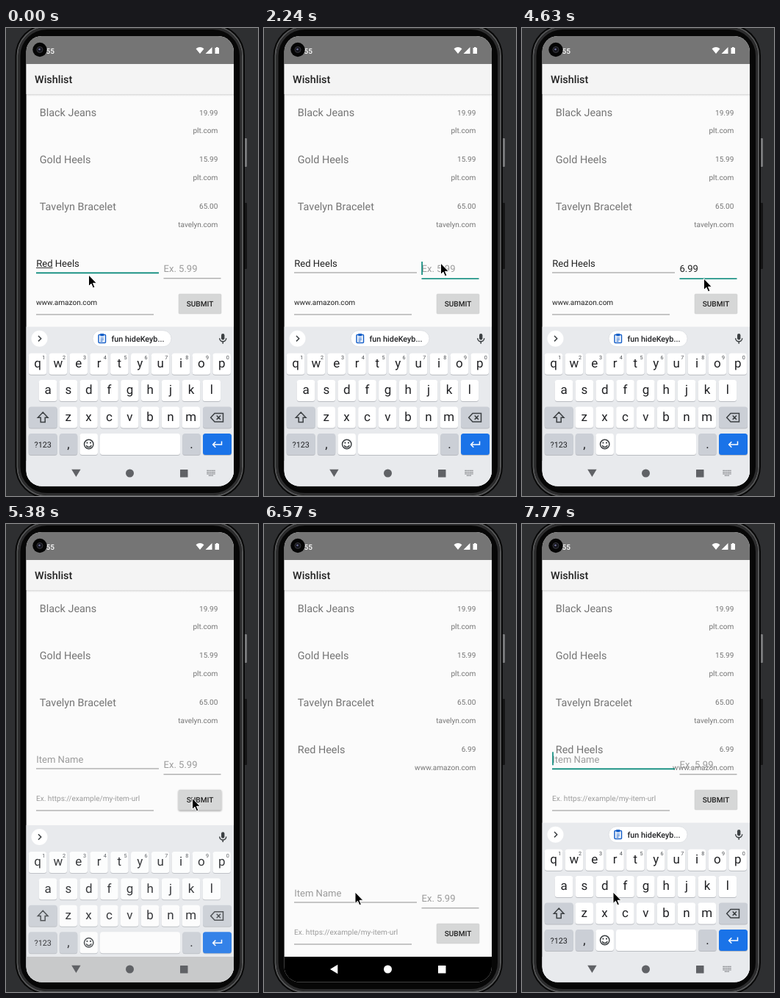
An HTML page for the animation above (8 s loop, 343x637 px).

```html
<!DOCTYPE html>
<html lang="en">
<head>
<meta charset="utf-8">
<title>Wishlist</title>
<style>
  html, body { margin: 0; width: 100%; height: 100%; overflow: hidden; background: #2e2f31; }
  svg { display: block; width: 343px; height: 637px; font-family: Roboto, sans-serif; text-rendering: geometricPrecision; }
  .list { fill: #757575; font-size: 10.07px; }
  .list .item { font-size: 14.39px; }
  .input { font-size: 13.05px; fill: #212121; }
  .small { font-size: 10.07px; }
  .hint { fill: #9b9b9b; }
  .medium { font-weight: 500; }
  .end { text-anchor: end; }
  .key { font-size: 17px; text-anchor: middle; fill: #202124; }
  .digit { font-size: 7.2px; text-anchor: middle; fill: #4a4d51; }
  .icon { fill: none; stroke: #3c4043; stroke-width: 1.5; }
</style>
</head>
<body>
<svg viewBox="0 0 343 637">
  <defs>
    <linearGradient id="fade" x2="0" y2="1"><stop stop-color="#000" stop-opacity=".14"/><stop offset="1" stop-color="#000" stop-opacity="0"/></linearGradient>
    <filter id="soft" x="-20%" y="-30%" width="140%" height="180%"><feDropShadow dx="0" dy="1.2" stdDeviation="1.3" flood-opacity=".45"/></filter>
    <clipPath id="screen"><rect x="27.6" y="11" width="282.4" height="612.6" rx="21"/></clipPath>
  </defs>

  <rect width="343" height="637" fill="#2e2f31"/>
  <rect x="324.5" y="150" width="3.5" height="39" rx="1" fill="#77787a"/>
  <rect x="324.5" y="238" width="3.5" height="90" rx="1" fill="#141415"/>
  <rect x="12.5" y="-5" width="312.5" height="645" rx="43" fill="#070707"/>
  <g fill="none">
    <rect x="15.5" y="-2" width="306.5" height="639" rx="40" stroke="#555657" stroke-width="2"/>
    <rect x="18" y=".5" width="301.5" height="634" rx="37.5" stroke="#2c2c2d" stroke-width="3"/>
  </g>

  <g clip-path="url(#screen)">
    <rect x="27" y="11" width="284" height="613" fill="#fbfbfb"/>
    <rect x="27" y="90" width="284" height="3" fill="url(#fade)"/>
    <rect x="27" y="49" width="284" height="41" fill="#f4f4f4"/>
    <rect x="27" y="11" width="284" height="38" fill="#757575"/>
    <text class="small medium end" x="66" y="34.5" fill="#fff">55</text>
    <path fill="#fff" d="M258.5 28.2Q264 24 269.5 28.2L264 35ZM280.5 26V35H271.5ZM284.5 27H286V26H288.5V27H290V35H284.5Z"/>
    <circle cx="46" cy="29.5" r="9.7" fill="#050505"/>
    <circle cx="46" cy="29.5" r="4" fill="#15161d" stroke="#38383d"/>
    <circle cx="45.5" cy="29" r="1.3" fill="#6e7099"/>
    <text class="medium" x="39" y="75" font-size="14.39" fill="#212121">Wishlist</text>

    <g id="list" class="list"></g>

    <g id="form">
      <text id="name" class="input" x="41.2" y="324.8"></text>
      <path id="composing" d="M41 326.5H63.5" stroke="#333"/>
      <text id="price" class="input" x="214.5" y="332.3"></text>
      <text id="url" class="input small" x="41" y="376.6"></text>
      <path id="nameLine" d="M41 333H208"/>
      <path id="priceLine" d="M214.5 340.8H292.5"/>
      <path d="M41 390H201" stroke="#8f8f8f"/>
      <rect id="button" x="235" y="362" width="58" height="27" rx="1.5" fill="#d6d7d7" stroke="#c9caca" stroke-width=".5"/>
      <text class="small medium" x="264" y="379.4" text-anchor="middle" fill="#212121">SUBMIT</text>
      <rect id="caret" width="1.6" height="18" fill="#008577"/>
    </g>

    <g id="keyboard">
      <rect x="27" y="406.6" width="284" height="240" fill="#e8eaed"/>
      <circle cx="45.5" cy="422.7" r="11" fill="#fff"/>
      <path class="icon" d="M44 419L47.7 422.7L44 426.4"/>
      <g id="chip">
        <rect x="118" y="411.7" width="107" height="22" rx="11" fill="#fff" stroke="#dadce0" stroke-width=".8"/>
        <rect x="126" y="417.5" width="9.5" height="11" rx="1" fill="none" stroke="#1a62c9" stroke-width="1.5"/>
        <path d="M128.3 416H133.2V419.5H128.3ZM128.5 421.5H133V422.5H128.5ZM128.5 423.7H133V424.7H128.5ZM128.5 425.8H131.5V426.8H128.5Z" fill="#1a62c9"/>
        <text class="medium" x="143.5" y="426.8" font-size="10.8" fill="#202124">fun hideKeyb...</text>
      </g>
      <rect x="293" y="416" width="4.4" height="8.4" rx="2.2" fill="#3c4043"/>
      <path class="icon" d="M290.7 422.3A4.5 4.5 0 0 0 299.7 422.3M295.2 426.8V429.8"/>
      <g id="keys"></g>
    </g>

    <rect id="nav" x="27" y="589" width="284" height="36"/>
    <g id="navIcons">
      <path id="back" d="M89.2 600.7H101.6L95.4 611Z"/>
      <circle cx="168.5" cy="606" r="5.5"/>
      <rect x="237" y="601" width="10.5" height="10.5" rx=".6"/>
    </g>
    <path id="switcher" d="M273.5 602.3H285M273.5 604.6H285M273.5 606.9H285M276 609.2H282.5" stroke="#606266" stroke-width="1.2" stroke-dasharray="1.3 .9"/>
  </g>

  <path id="mouse" d="M-.5 0V15.5L3 12.2L5.4 17.8L7.9 16.8L5.5 11.3H10.4Z" fill="#000" stroke="#fff"/>
</svg>

<script>
const $ = id => document.getElementById(id);
const set = (id, attrs) => { for (const k in attrs) $(id).setAttribute(k, attrs[k]); };
const show = (id, on) => set(id, { visibility: on ? 'visible' : 'hidden' });

// Wishlist rows
const items = [
  ['Black Jeans', '19.99', 'plt.com'],
  ['Gold Heels', '15.99', 'plt.com'],
  ['Tavelyn Bracelet', '65.00', 'tavelyn.com'],
  ['Red Heels', '6.99', 'www.amazon.com'],
];
$('list').innerHTML = items.map(([name, price, url], i) => `
  <g id="row${i}" transform="translate(0 ${i * 63.9})">
    <text class="item" x="45.8" y="120">${name}</text>
    <text class="end" x="288.3" y="118.6">${price}</text>
    <text class="end" x="288.3" y="143.3">${url}</text>
  </g>`).join('');

// Keyboard
const PITCH = 27.85, GREY = '#cbcfd6';
const cap = (x, y, w, fill = '#fff') =>
  `<rect x="${x - w / 2}" y="${y - 13.5}" width="${w}" height="29" rx="3.5" fill="#b9bcc1"/>
   <rect x="${x - w / 2}" y="${y - 14.5}" width="${w}" height="29" rx="3.5" fill="${fill}"/>`;
const label = (x, y, text, size = 17) =>
  `<text class="key" x="${x}" y="${y}" style="font-size:${size}px">${text}</text>`;
const letters = (row, x0, y) => [...row].map((c, i) =>
  cap(x0 + i * PITCH, y, 24.5) + label(x0 + i * PITCH, y + 4.8, c)).join('');
const digits = [...'1234567890'].map((d, i) =>
  `<text class="digit" x="${51.2 + i * PITCH}" y="450.8">${d}</text>`).join('');

$('keys').innerHTML =
  letters('qwertyuiop', 43, 457.3) + digits +
  letters('asdfghjkl', 57, 493.5) +
  cap(50.2, 530, 39, GREY) + letters('zxcvbnm', 84.7, 530) + cap(287.5, 530, 39, GREY) +
  cap(50.2, 566.5, 39, GREY) + label(50.2, 570.8, '?123', 10.8) +
  cap(85, 566.5, 24.5, GREY) + label(85, 571.5, ',') +
  cap(112.7, 566.5, 24.5) + cap(182.5, 566.5, 109) +
  cap(252.5, 566.5, 24.5, GREY) + label(252.5, 571.5, '.') +
  cap(287.5, 566.5, 39, '#1a73e8') +
  `<path class="icon" d="M50.2 523L57 530.3H53.2V536.5H47.2V530.3H43.4Z
     M284 524.5H295.5V536H284L278.7 530.2ZM286.7 527.5L292 532.9M292 527.5L286.7 532.9"/>
   <circle class="icon" cx="112.7" cy="566.5" r="6.2"/>
   <path class="icon" d="M109.3 568A3.6 3.6 0 0 0 116.1 568"/>
   <circle cx="110.4" cy="564.6" r="1.1" fill="#3c4043"/><circle cx="115" cy="564.6" r="1.1" fill="#3c4043"/>
   <path class="icon" style="stroke:#fff" d="M293.5 562.5V567H281.8M285.3 563.3L281.6 567L285.3 570.7"/>`;

const LOOP = 8000, TICK = 149.4;

const mousePath = [[0, 113, 336], [3, 49, 368], [7, 240, 373], [8, 240, 373], [13, 241, 320], [30, 241, 320],
  [31, 248, 341], [34, 254, 373], [39, 254, 373], [43, 128, 498], [44, 124.5, 501], [60, 124.5, 501]];

// from, to, x, y
const carets = [[2, 5, 101, 310.3], [8, 11, 101, 310.3], [14, 17, 214.3, 318], [22, 23, 222, 318],
  [23, 26, 225, 318], [26, 28, 232.7, 318], [28, 31, 240.4, 318], [34, 36, 240.4, 318],
  [45, 49, 41.2, 310.3], [52, 60, 41.2, 310.3]];

const typed = n => n < 22 ? '' : '6.99'.slice(0, n < 23 ? 1 : n < 26 ? 2 : n < 28 ? 3 : 4);

function mouseAt(n) {
  const i = mousePath.findIndex(p => p[0] > n);
  const [t0, x0, y0] = mousePath[i - 1], [t1, x1, y1] = mousePath[i];
  const k = (n - t0) / (t1 - t0);
  return [x0 + (x1 - x0) * k, y0 + (y1 - y0) * k];
}

function field(id, value, hint) {
  $(id).textContent = value || hint;
  $(id).classList.toggle('hint', !value);
}

function line(id, focused) {
  set(id, {
    stroke: focused ? '#008577' : '#8f8f8f',
    'stroke-width': focused ? 1.6 : 1,
    transform: `translate(0 ${focused ? .4 : 0})`,
  });
}

function draw(n) {
  const sent = n >= 36, closed = n >= 37 && n < 46, fading = n === 36;

  field('name', sent ? '' : 'Red Heels', 'Item Name');
  field('price', sent ? '' : typed(n), 'Ex. 5.99');
  field('url', sent ? '' : 'www.amazon.com', 'Ex. https://example/my-item-url');
  line('nameLine', n < 14 || n >= 45);
  line('priceLine', n >= 14 && !sent);
  show('composing', n < 14);
  show('row3', n >= 37);
  set('form', { transform: `translate(0 ${closed ? 182 : 0})` });
  set('button', { filter: n === 35 || fading ? 'url(#soft)' : 'none' });

  const caret = carets.find(([from, to]) => n >= from && n < to);
  show('caret', caret);
  if (caret) set('caret', { x: caret[2], y: caret[3] });

  const drop = n === 37 ? 100 : closed ? 240 : fading || n === 46 ? 3.3 : 0;
  set('keyboard', { transform: `translate(0 ${drop})` });
  set('keys', { opacity: fading ? .87 : 1 });
  show('chip', n < 36 || n >= 46);
  show('switcher', n < 36 || n >= 46);

  const turn = n === 37 ? 60 : closed ? 90 : n === 46 ? 20 : 0;
  set('nav', { fill: closed ? '#000' : fading ? '#c8c9ca' : '#e8eaed' });
  set('navIcons', { fill: closed ? '#fff' : '#606266' });
  set('back', { transform: `rotate(${turn} 95.2 605.8)` });

  show('mouse', n < 18 || n >= 31);
  set('mouse', { transform: `translate(${mouseAt(n)})` });
}

function frame() {
  draw(Math.floor((performance.now() % LOOP + 9) / TICK));
  requestAnimationFrame(frame);
}
frame();
</script>
</body>
</html>
```
